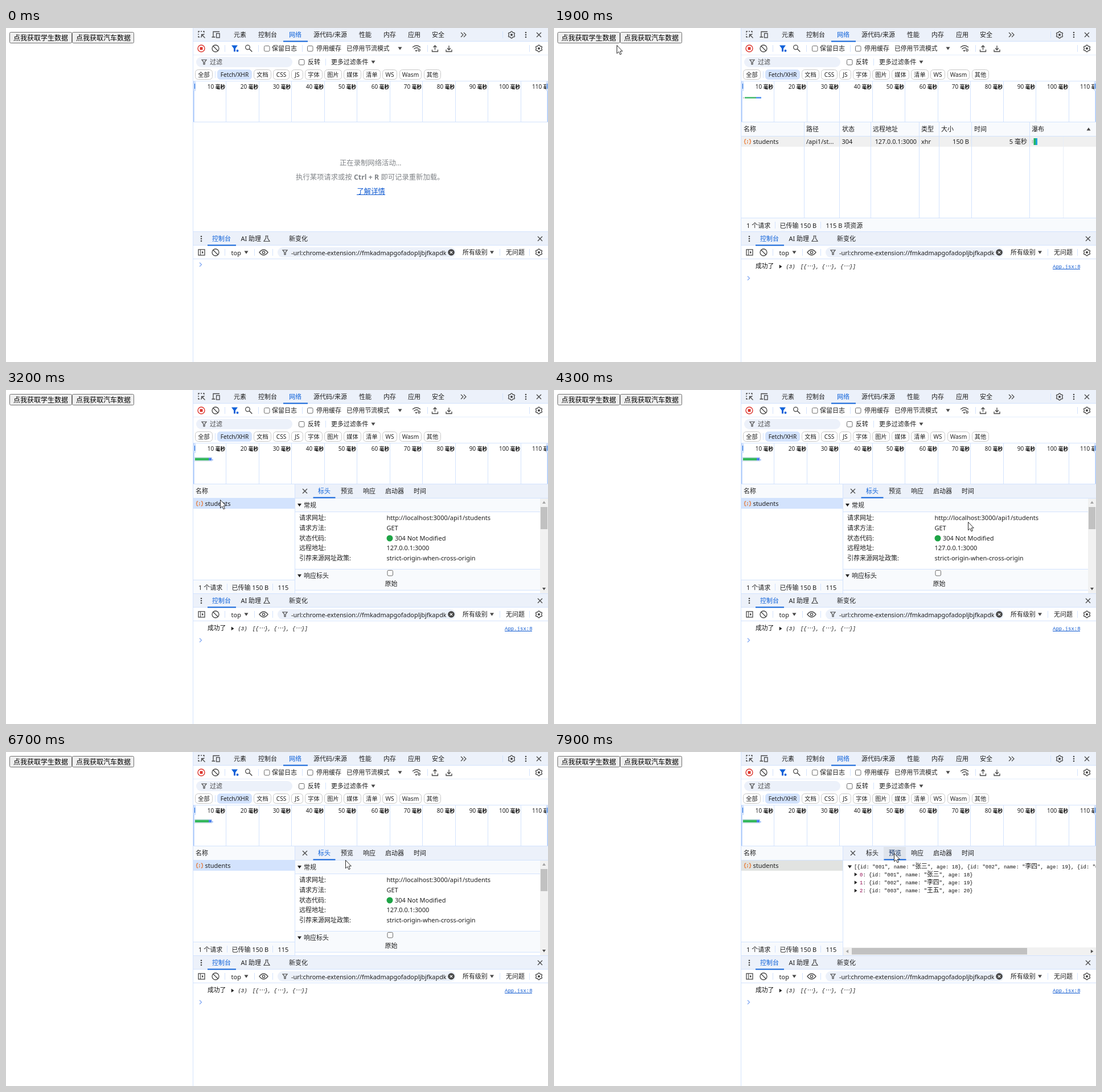
An HTML page for the animation above (8 s loop, 952 by 588 pixels).

```html
<!DOCTYPE html>
<html lang="zh-CN">
<head>
<meta charset="utf-8">
<title>Network panel</title>
<style>
html, body { margin: 0; width: 100%; height: 100%; overflow: hidden; background: #fff; }
svg { display: block; }
text { font-family: "Noto Sans", "Noto Sans CJK SC", sans-serif; white-space: pre; }
.mono { font-family: "Liberation Mono", "Noto Sans CJK SC", monospace; }
.cjk { font-family: "Noto Sans CJK SC", sans-serif; }
</style>
</head>
<body>
<svg id="stage" width="952" height="588" viewBox="0 0 952 588"></svg>
<script>
const INK = '#1f1f1f', ICON = '#474747', BLUE = '#0f62d9', LINE = '#d3e3fd', BAR = '#ecf1fa', PALE = '#f8fafd';
const LOOP = 8000;

// Drawing helpers; text is placed by its vertical middle.
const rect = (x, y, w, h, fill, extra = '') => `<rect x="${x}" y="${y}" width="${w}" height="${h}" fill="${fill}" ${extra}/>`;
const hline = (x, y, w, c = LINE) => rect(x, y, w, 1, c);
const vline = (x, y, h, c = LINE) => rect(x, y, 1, h, c);
const text = (x, y, s, { size = 11, fill = INK, extra = '' } = {}) =>
  `<text x="${x}" y="${y + size * 0.37}" font-size="${size}" fill="${fill}" ${extra}>${s}</text>`;
const mono = (x, y, s, extra = '') => {
  const body = s.replace(/[\u2026\u4e00-\u9fff]+/g, m => `<tspan class="cjk" font-size="10.8">${m}</tspan>`);
  return `<text class="mono" x="${x}" y="${y + 3.2}" font-size="8.95" fill="#111" ${extra}>${body}</text>`;
};
const stroke = (d, c = ICON, w = 1.3, extra = '') => `<path d="${d}" fill="none" stroke="${c}" stroke-width="${w}" ${extra}/>`;
const shape = (d, c = ICON) => `<path d="${d}" fill="${c}"/>`;
const disc = (x, y, r, c = ICON) => `<circle cx="${x}" cy="${y}" r="${r}" fill="${c}"/>`;
const ring = (x, y, r, c = ICON, w = 1.3) => `<circle cx="${x}" cy="${y}" r="${r}" fill="none" stroke="${c}" stroke-width="${w}"/>`;
const down = (x, y, c = ICON, r = 3.5) => shape(`M${x - r} ${y - r * .7}h${2 * r}l${-r} ${r * 1.5}z`, c);
const up = (x, y, c = ICON, r = 3.5) => shape(`M${x - r} ${y + r * .7}h${2 * r}l${-r} ${-r * 1.5}z`, c);
const right = (x, y, c = INK, r = 3.2) => shape(`M${x - r * .7} ${y - r}v${2 * r}l${r * 1.5} ${-r}z`, c);
const left = (x, y, c = INK, r = 3.2) => shape(`M${x + r * .7} ${y - r}v${2 * r}l${-r * 1.5} ${-r}z`, c);
const sep = (x, y) => vline(x, y - 6, 12);
const check = (x, y) => rect(x + .5, y - 4.5, 9.5, 9.5, '#fff', 'rx="2" stroke="#6b6b6b"');

// Icons, given by their centre.
const close = (x, y) => stroke(`M${x - 4} ${y - 4}l8 8m0 -8l-8 8`);
const kebab = (x, y) => [-4, 0, 4].map(d => disc(x, y + d, 1.3)).join('');
const clear = (x, y) => ring(x, y, 6) + stroke(`M${x - 4.2} ${y - 4.2}l8.4 8.4`);
const funnel = (x, y) => stroke(`M${x - 4} ${y - 4}h8l-3 4v4h-2v-4z`, ICON, 1.2);
const gear = (x, y) => {
  let d = '';
  for (let i = 0; i < 24; i++) {
    const a = (i - .5) * Math.PI / 12 + Math.PI / 6, r = i % 4 < 2 ? 6 : 4.7;
    d += `${i ? 'L' : 'M'}${(x + r * Math.cos(a)).toFixed(2)} ${(y + r * Math.sin(a)).toFixed(2)}`;
  }
  return stroke(d + 'z', ICON, 1.3, 'stroke-linejoin="round"') + disc(x, y, 2.1);
};
const tray = (x, y, arrow) => stroke(`M${x - 5} ${y + 2}v3.5h10v-3.5M${x} ${y - 5}v7.5${arrow}`);
const json = (x, y) => {
  const half = s => `M${x + s * 2.6} ${y - 4}h${s}q${s * 1.2} 0 ${s * 1.2} 1.4v1.2q0 1.4 ${s * 1.3} 1.4q${-s * 1.3} 0 ${-s * 1.3} 1.4v1.2q0 1.4 ${-s * 1.2} 1.4h${-s}`;
  return stroke(half(-1) + half(1), '#e8610d', 1.1) + disc(x, y - 1.4, .9, '#e8610d') + stroke(`M${x + .3} ${y + .8}l-.9 2.4`, '#e8610d', 1.1);
};

function page() {
  const button = (id, x, w, s) => rect(x + .5, 7.5, w, 19, '#efefef', `id="${id}" rx="2" stroke="#707070"`) + text(x + 7, 17.5, s, { size: 12, fill: '#000' });
  return button('btn', 6, 109, '点我获取学生数据') + button('btn2', 116, 108, '点我获取汽车数据') + vline(328, 0, 588);
}

function topBars() {
  const tabs = [[400, '元素'], [443, '控制台'], [497, '网络'], [540, '源代码/来源'], [620, '性能'], [663, '内存'], [706, '应用'], [748, '安全']];
  const pills = [[332, 31, '全部'], [371, 61, 'Fetch/XHR'], [435, 31, '文档'], [469, 29, 'CSS'], [501, 21, 'JS'], [525, 31, '字体'], [559, 31, '图片'],
    [593, 31, '媒体'], [627, 31, '清单'], [661, 26, 'WS'], [691, 39, 'Wasm'], [734, 30, '其他']];
  return rect(329, 0, 623, 23, BAR) + hline(329, 23, 623) + rect(487, 22.5, 43, 2, BLUE)
    + stroke('M338 8v-2h2m2 0h2m2 0h2v2m0 2v1M338 10v2m0 2v2h2m2 0h1') + stroke('M349.5 17.5l-6 -6m0 4.5v-4.5h4.5')
    + stroke('M364 15.5v-9h11M361.5 16h6') + rect(369.6, 9.6, 5.5, 7.4, 'none', `stroke="${ICON}" stroke-width="1.3"`)
    + tabs.map(([x, s]) => text(x, 12, s, { fill: s === '网络' ? BLUE : INK })).join('')
    + stroke('M799 8l4 4l-4 4m5 -8l4 4l-4 4', ICON, 1.2) + sep(872, 12) + gear(888, 12) + kebab(913, 12) + close(936, 12)
    // action row
    + ring(343, 36, 6, '#dc362e', 1.4) + rect(340.5, 33.5, 5, 5, '#dc362e') + clear(368, 36) + sep(384, 36)
    + shape('M396 30.5h11l-4 5.5v5.5h-3v-5.5z', BLUE) + disc(406.5, 40, 2, BLUE)
    + ring(424.5, 34, 3.8) + stroke('M427.3 36.8l5 5', ICON, 1.5) + sep(443, 36)
    + check(453, 36) + text(467, 36, '保留日志') + sep(520, 36) + check(529, 36) + text(545, 36, '停用缓存')
    + text(598, 36, '已停用节流模式', { size: 10.8 }) + down(692, 36)
    + stroke('M714 34q7 -6 14 0M716.5 37q4 -4 8 -1') + disc(720.5, 40, 1.4) + ring(725.5, 39, 1.8) + sep(740, 36)
    + tray(753.5, 36, 'm-3 -4.5l3 -3l3 3') + tray(778, 36, 'm-3 -3l3 3l3 -3') + sep(919, 36) + gear(936, 36) + hline(329, 47, 623, '#e4edfb')
    // filter rows
    + rect(334, 51, 169, 18, BAR, 'rx="9"') + funnel(348, 60) + text(358, 60, '过滤', { fill: ICON })
    + check(514, 60) + text(530, 60, '反转') + sep(561, 60) + text(571, 60, '更多过滤条件', { size: 10.9 }) + down(645, 60)
    + pills.map(([x, w, s]) => rect(x + .5, 73.5, w - 1, 17, s === 'Fetch/XHR' ? LINE : '#fff', `rx="5" stroke="${s === 'Fetch/XHR' ? LINE : '#c7c7c7'}"`)
      + text(x + w / 2, 82, s, { size: 10.2, extra: 'text-anchor="middle"' })).join('')
    + sep(367, 82) + hline(329, 93, 623);
}

function overview() {
  let out = '';
  for (let i = 1; i <= 11; i++) {
    const x = 329 + Math.floor(57.55 * i);
    out += vline(x, 94, 71) + `<text x="${x - 1}" y="106.5" font-size="10" fill="${INK}" text-anchor="end">${i * 10} <tspan class="cjk" font-size="8.6" font-weight="700" fill="#000">毫秒</tspan></text>`;
  }
  const handle = x => rect(x, 94, 4, 17, LINE, 'rx="1.5"') + rect(x + 1.5, 98, 1, 9, BLUE);
  return out + rect(329, 94, 1.6, 71, '#a8c7fa') + handle(329.5) + rect(950.5, 94, 1.5, 71, '#a8c7fa') + handle(948.5) + hline(329, 165, 623);
}

function drawer() {
  return hline(329, 358, 623) + rect(329, 359, 623, 23, BAR) + hline(329, 382, 623) + rect(354, 381.5, 50, 2, BLUE)
    + kebab(343, 371) + text(362, 371, '控制台', { fill: BLUE }) + text(412.5, 371, 'AI 助理')
    + stroke('M455.5 366h5M456.5 366v4l-3.5 5.5h10l-3.5 -5.5v-4', ICON, 1.2) + text(497, 371, '新变化') + close(938, 371)
    + rect(338, 390, 11, 10, 'none', `stroke="${ICON}" stroke-width="1.3"`) + vline(341, 390, 10, ICON) + shape('M344 392.5v5l3 -2.5z')
    + clear(368, 395) + sep(384, 395) + text(395.5, 395.5, 'top') + down(422, 395) + sep(436, 395)
    + stroke('M445 395q7.5 -9.5 15 0q-7.5 9.5 -15 0z') + ring(452.5, 395, 2.2) + sep(468, 395)
    + rect(477, 386, 313, 18, BAR, 'rx="9"') + funnel(490, 395)
    + `<g clip-path="url(#query)">${text(501, 395.5, '-url:chrome-extension://fmkadmapgofadopljbjfkapdk', { size: 10.9 })}</g>`
    + disc(782, 395, 5.8) + stroke('M779.8 392.8l4.4 4.4m0 -4.4l-4.4 4.4', '#fff', 1.2)
    + text(802, 395, '所有级别', { size: 10.9 }) + down(853.5, 395) + sep(867, 395) + text(878, 395, '无问题') + sep(919, 395) + gear(936, 395) + hline(329, 406, 623)
    + `<g id="prompt">${stroke('M340 413l3.5 3.5l-3.5 3.5', '#7ba4f2', 1.2)}</g>`;
}

function emptyNote() {
  const o = { size: 12.35, fill: '#808488' };
  return text(586, 237.7, '正在录制网络活动…', o)
    + text(509, 262.7, '执行某项请求或按 <tspan font-weight="700">Ctrl + R</tspan> 即可记录重新加载。', o)
    + text(616.5, 287.7, '了解详情', { ...o, fill: '#0b57d0' }) + hline(616, 293, 50, '#0b57d0');
}

function logLine() {
  const it = 'font-style="italic"';
  return mono(354, 420, '成功了') + right(398, 420) + mono(407.5, 420, '(3)', it) + mono(433, 420, '[{…}, {…}, {…}]', it)
    + `<text class="mono" x="876" y="423" font-size="9" fill="#0b57d0">App.jsx:8</text>` + hline(876, 424, 48, '#0b57d0');
}

const footer = () => hline(329, 334, 623) + rect(329, 335, 623, 23, PALE) + text(338, 347.5, '1 个请求') + sep(388, 347)
  + text(396.5, 347.5, '已传输 150 B') + sep(468, 347) + text(477.5, 347.5, '115 B 项资源');

function table() {
  const cols = [[333, '名称'], [443, '路径'], [506, '状态'], [560, '远程地址'], [645, '类型'], [680, '大小'], [738, '时间'], [839, '瀑布']];
  const end = { extra: 'text-anchor="end"' };
  return rect(329, 166, 623, 24, PALE) + hline(329, 190, 623) + rect(329, 191, 623, 18, '#f0f0f0')
    + cols.map(([x, s]) => text(x, 178, s)).join('') + up(939, 178)
    + vline(894, 191, 143, '#e8eef8') + [439, 501, 556, 641, 676, 733, 835].map(x => vline(x, 166, 168)).join('')
    + json(340, 200) + text(349.5, 200, 'students') + text(443, 200, '/api1/st...') + text(505.5, 200, '304') + text(637, 200, '127.0.0.1:3000', { ...end, size: 10.8 })
    + text(645, 200, 'xhr') + text(729, 200, '150 B', end) + text(831, 200, '5 毫秒', end)
    + rect(839.5, 197, 2, 6, '#c8c8c8') + rect(842.5, 194, 3.5, 12, '#1fb463') + rect(846, 194, 3, 12, '#20a4d8') + footer();
}

function split() {
  return rect(329, 166, 178, 24, PALE) + hline(329, 190, 178) + text(333, 178, '名称')
    + rect(329, 191, 178, 18, LINE, 'id="row"') + json(340, 200) + text(349.5, 200, 'students') + footer()
    + rect(498, 335, 10, 23, PALE) + rect(508, 166, 444, 192, '#fff') + vline(507, 166, 192)
    + rect(508, 166, 444, 24, BAR) + rect(579, 167, 39, 22, '#dfe4ec', 'id="hover"') + hline(508, 190, 444) + close(525, 178);
}

const subTabs = (active, fill) => [[548, '标头'], [588, '预览'], [627, '响应'], [666, '启动器'], [716, '时间']]
  .map(([x, s]) => text(x, 178, s, { fill: s === active ? fill : INK })
    + (s === active ? rect(x - 8.5, 188.5, 39, 2, BLUE) : '')).join('');

function headers() {
  const rows = [['请求网址:', 'http://localhost:3000/api1/students'], ['请求方法:', 'GET'], ['状态代码:', '304 Not Modified'],
    ['远程地址:', '127.0.0.1:3000'], ['引荐来源网址政策:', 'strict-origin-when-cross-origin']];
  return rect(508, 191, 430, 23, PALE) + subTabs('标头', BLUE) + hline(508, 214, 430) + down(515.5, 202.5, INK) + text(523, 202.5, '常规')
    + rows.map(([k, v], i) => text(515, 225 + 17.8 * i, k) + text(i === 2 ? 683 : 668.5, 225 + 17.8 * i, v)).join('') + disc(674, 261, 5.5, '#1ea446')
    + hline(508, 315, 430) + rect(508, 316, 430, 36, PALE) + hline(508, 352, 430) + down(515.5, 327, INK) + text(523, 327, '响应标头')
    + check(669.5, 322) + text(665.5, 341, '原始')
    + rect(938, 191, 14, 167, '#f1f1f1') + rect(939, 206, 12, 39, '#c1c1c1') + up(945, 198, '#a3a3a3', 3) + down(945, 350, '#505050', 3);
}

function treeView() {
  const people = [['001', '张三', 18], ['002', '李四', 19], ['003', '王五', 20]].map(([id, name, age]) => `{id: "${id}", name: "${name}", age: ${age}}`);
  return down(519.5, 202, INK, 3.5) + mono(527, 201.5, `[${people.join(', ')}]`)
    + people.map((p, i) => {
      const y = 215.5 + 14.3 * i;
      return right(530, y) + mono(537, y, `<tspan fill="#8e004b">${i}</tspan>: ${p}`);
    }).join('')
    + rect(508, 344, 444, 14, '#f1f1f1') + rect(523, 345, 308, 11.5, '#c1c1c1') + left(515, 351, '#a3a3a3', 3) + right(945, 351, '#505050', 3);
}

const tooltip = () => rect(385.5, 209.5, 192, 18, '#fff', 'stroke="#b8b8b8" rx="2"') + text(390, 218.5, 'http://localhost:3000/api1/students');
const group = (id, body) => `<g id="${id}">${body}</g>`;
const stage = document.getElementById('stage');

stage.innerHTML = '<clipPath id="query"><path d="M501 384h272v22h-272z"/></clipPath>'
  + page() + topBars() + overview()
  + group('thin', rect(332, 122, 2, 2, '#c8c8c8') + rect(335, 121.5, 20, 2.5, '#43b96a') + rect(355, 121.5, 9, 2.5, '#4b8df0'))
  + group('thick', rect(331, 118, 31, 8, '#dfe7f5') + rect(332, 119.5, 24, 4.5, '#35b85c') + rect(356, 119.5, 5, 4.5, '#4b7fee') + rect(362, 122, 1.5, 2, '#7aa7f5'))
  + group('empty', emptyNote()) + group('table', table())
  + group('split', split() + group('headers', headers()) + group('previewTab', subTabs('预览', '#0a2a5c')) + group('tree', treeView()))
  + drawer() + group('log', logLine()) + group('tip', tooltip())
  + group('cursor', '<path d="M.5 .5V14.8L3.8 11.8 6 16.8 8.3 15.8 6.2 10.9H10.3Z" fill="#fff" stroke="#111" stroke-width=".9"/>');

// Pointer keys: time, x, y.
const path = [[600, 101, -17], [900, 97, 3], [1200, 91, 15.5], [1800, 91, 15.5], [1900, 110, 30], [2000, 137, 56], [2100, 147, 79], [2200, 192, 147],
  [2300, 267, 202], [2400, 345, 210], [2500, 365, 205], [2600, 376, 193], [3400, 376, 193], [3600, 425, 198], [3900, 590, 222], [4100, 690, 231],
  [4300, 727, 232], [4800, 790, 235], [5200, 851, 240], [5400, 855, 235], [5500, 855, 235], [5600, 848, 235], [5700, 829, 235], [6100, 715, 242],
  [6400, 641, 246], [6500, 628, 230], [6700, 596, 190], [6900, 597, 182], [7100, 597, 178], [LOOP, 597, 178]];

function pointer(t) {
  const i = Math.max(1, path.findIndex(k => k[0] >= t));
  const [a, b] = [path[i - 1], path[i]];
  const f = Math.max(0, (t - a[0]) / (b[0] - a[0]));
  return [a[1] + (b[1] - a[1]) * f, a[2] + (b[2] - a[2]) * f];
}

const el = id => document.getElementById(id);
const show = (id, on) => el(id).setAttribute('display', on ? 'inline' : 'none');

function draw(ms) {
  const t = Math.floor(ms / 100) * 100;
  const loaded = t >= 1500, opened = t >= 3200, preview = t >= 7600;
  const [x, y] = pointer(t);
  show('empty', !loaded);
  show('log', loaded);
  show('table', loaded && !opened);
  show('thin', loaded && t < 3100);
  show('thick', t >= 3100);
  show('tip', t === 3100);
  show('split', opened);
  show('headers', !preview);
  show('previewTab', preview);
  show('tree', t >= 7700);
  show('hover', x >= 579 && x < 618 && y < 190);
  show('cursor', t >= 700);
  el('cursor').setAttribute('transform', `translate(${x.toFixed(1)} ${y.toFixed(1)})`);
  el('prompt').setAttribute('transform', `translate(0 ${loaded ? 24 : 0})`);
  el('row').setAttribute('fill', preview ? '#e1e3e1' : LINE);
  const over = t >= 700 && x < 116 && y > 7 && y < 27;
  el('btn').setAttribute('fill', t === 1400 ? '#f5f5f5' : over ? '#e5e5e5' : '#efefef');
}

function tick() {
  draw(performance.now() % LOOP);
  requestAnimationFrame(tick);
}
tick();
</script>
</body>
</html>
```
